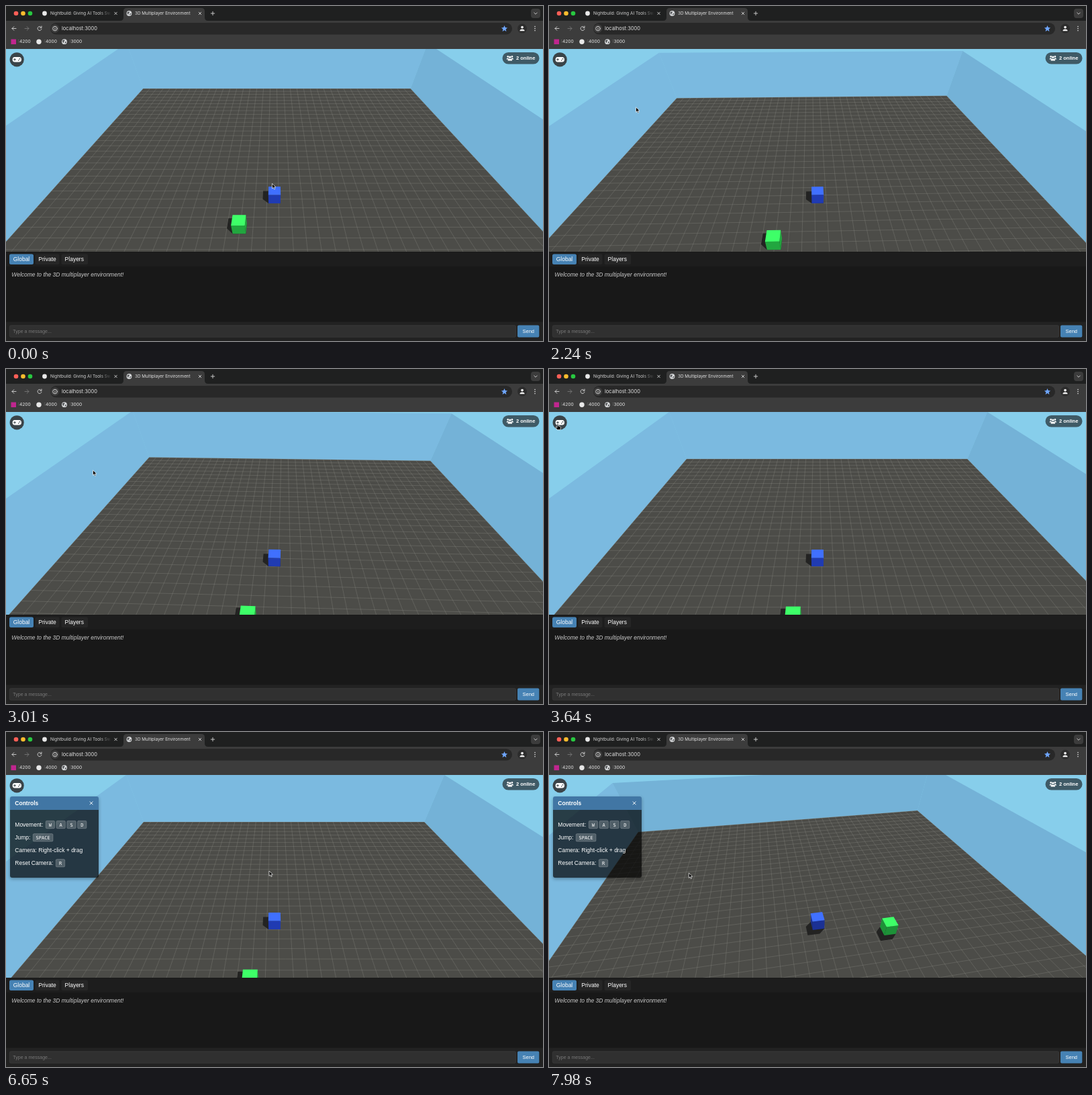
An HTML page with a canvas that plays this animation: 800x499 px, repeating every 8000 ms.

```html
<!DOCTYPE html>
<html lang="en">
<head>
<meta charset="utf-8">
<title>3D Multiplayer Environment</title>
<style>
html, body { margin: 0; width: 100%; height: 100%; overflow: hidden; background: #181818; }
canvas, svg, #shadow { position: absolute; left: 0; top: 0; }
canvas { top: 64px; }
#shadow { left: 6px; top: 96px; width: 132px; height: 121px; border-radius: 3px; box-shadow: 0 2px 5px rgba(0, 0, 0, .3); }
text { font-family: "Liberation Sans", Arial, sans-serif; font-size: 8.5px; fill: #fff; }
.ui { font-family: Inter, "Liberation Sans", sans-serif; font-size: 6.35px; fill: #e3e3e3; }
.key { font-family: "DejaVu Sans Mono", monospace; font-size: 7px; text-anchor: middle; }
.line { fill: none; stroke: #d5d5d5; stroke-width: .9; stroke-linecap: round; stroke-linejoin: round; }
</style>
</head>
<body>
<canvas id="scene" width="800" height="302"></canvas>
<div id="shadow"></div>
<svg id="ui" width="800" height="499" viewBox="0 0 800 499">
  <defs>
    <linearGradient id="fade" gradientUnits="userSpaceOnUse" x1="140" x2="157" y1="0" y2="0">
      <stop offset="0" stop-color="#d2d2d2"/><stop offset="1" stop-color="#d2d2d2" stop-opacity="0"/>
    </linearGradient>
    <g id="globe">
      <circle r="3.9" fill="#d4d6d8"/>
      <path d="M-3-1.6Q-1-3 .4-2.4Q.4-.6-1-.2Q-.6 1.6-2 1.8ZM1 .4Q3-.6 3 .6Q2 2.6 .8 2.8Z" fill="#4a4c4e"/>
    </g>
    <path id="cross" class="line" d="M-1.8-1.8L1.8 1.8M1.8-1.8L-1.8 1.8"/>
  </defs>

  <!-- browser window -->
  <rect width="800" height="22" fill="#1f2020"/>
  <rect y="22" width="800" height="42" fill="#3c3c3c"/>
  <path d="M170 22Q175 22 175 17V8Q175 3 180 3H291Q296 3 296 8V17Q296 22 301 22Z" fill="#3c3c3c"/>
  <circle cx="15" cy="11" r="3.3" fill="#ff5f57"/>
  <circle cx="25.5" cy="11" r="3.3" fill="#febc2e"/>
  <circle cx="36" cy="11" r="3.3" fill="#28c840"/>
  <circle cx="57.5" cy="11" r="3.4" fill="#e8e8e8"/>
  <text class="ui" x="66" y="13.2" style="fill:url(#fade)">Nightbuild: Giving AI Tools Sway</text>
  <use href="#cross" x="163.5" y="11"/>
  <use href="#globe" x="183.5" y="11"/>
  <text class="ui" x="192" y="13.2">3D Multiplayer Environment</text>
  <use href="#cross" x="289" y="11"/>
  <path class="line" d="M305.3 11H310.7M308 8.3V13.7"/>
  <rect x="782" y="4" width="14" height="14" rx="4" fill="#3c3c3c"/>
  <path class="line" d="M786.8 10L789 12.2L791.2 10"/>

  <rect x="66" y="25" width="688" height="17.5" rx="8.7" fill="#282828"/>
  <path class="line" d="M15 33.5H9M11.8 30.7L9 33.5L11.8 36.3"/>
  <path class="line" d="M28 33.5H34M31.2 30.7L34 33.5L31.2 36.3" style="stroke:#777"/>
  <path class="line" d="M52.4 31.6A3 3 0 1 0 53 34.2M53 30V32.4H50.6"/>
  <circle cx="73" cy="33.6" r="6.3" fill="#3c3c3c"/>
  <circle class="line" cx="73" cy="33.6" r="3.3"/>
  <path class="line" d="M73 33.4V35.2M73 31.9V32"/>
  <text class="ui" x="83" y="36.3" style="font-size:7.5px">localhost:3000</text>
  <path d="M742.5 29L743.8 32.1L747.1 32.4L744.6 34.6L745.4 37.9L742.5 36.1L739.6 37.9L740.4 34.6L737.9 32.4L741.2 32.1Z" fill="#6ea5fb"/>
  <circle cx="769" cy="33.6" r="7" fill="#2c2c2c"/>
  <circle cx="769" cy="31.6" r="1.9" fill="#eee"/>
  <path d="M765.4 37.2Q765.4 34.4 769 34.4Q772.6 34.4 772.6 37.2Z" fill="#eee"/>
  <g fill="#ddd"><circle cx="788" cy="30.6" r=".8"/><circle cx="788" cy="33.6" r=".8"/><circle cx="788" cy="36.6" r=".8"/></g>

  <rect x="7.5" y="49.5" width="7.5" height="7.5" fill="#c0268f"/>
  <text class="ui" x="18" y="55.4" style="font-size:6.7px">:4200</text>
  <circle cx="49" cy="53.2" r="3.7" fill="#e8e8e8"/>
  <text class="ui" x="57" y="55.4" style="font-size:6.7px">:4000</text>
  <use href="#globe" x="87" y="53.2"/>
  <text class="ui" x="94.5" y="55.4" style="font-size:6.7px">:3000</text>

  <!-- overlay buttons -->
  <circle cx="16.2" cy="79.8" r="10.6" fill="#3a4449"/>
  <path fill-rule="evenodd" fill="#fff" d="M13 76H19.4Q23 76 23 79.8Q23 83.6 19.4 83.6H13Q9.6 83.6 9.6 79.8Q9.6 76 13 76ZM12.5 78V79.3H11.2V80.3H12.5V81.6H13.5V80.3H14.8V79.3H13.5V78ZM18 80.2V81.6H19.4V80.2ZM19.8 78V79.4H21.2V78Z"/>
  <rect x="739.5" y="69" width="55" height="17.6" rx="8.8" fill="#3f5a66"/>
  <g fill="#fff">
    <circle cx="747.7" cy="75.3" r="1.3"/><circle cx="753.9" cy="75.3" r="1.3"/><circle cx="750.8" cy="76.2" r="1.6"/>
    <path d="M745.6 79.6Q745.6 77.2 748.6 77.2V79.6ZM756 79.6Q756 77.2 753 77.2V79.6ZM747.5 81.6Q747.5 78.4 750.8 78.4Q754.1 78.4 754.1 81.6Z"/>
  </g>
  <text x="760" y="80.4" style="font-size:7.5px;font-weight:700">2 online</text>

  <!-- controls panel -->
  <g id="panel">
    <path d="M6 116V99Q6 96 9 96H135Q138 96 138 99V116Z" fill="#3f74a3" fill-opacity=".97"/>
    <path d="M6 116H138V214Q138 217 135 217H9Q6 217 6 214Z" fill="#000" fill-opacity=".7"/>
    <text x="13.3" y="109" font-weight="700">Controls</text>
    <path class="line" d="M125 103.8L129.2 108M129.2 103.8L125 108" style="stroke:#fff"/>
    <text x="13.3" y="141">Movement:</text>
    <text x="13.3" y="160">Jump:</text>
    <text x="13.3" y="179.2">Camera: Right-click + drag</text>
    <text x="13.3" y="198.2">Reset Camera:</text>
    <g id="keys"></g>
  </g>

  <!-- chat -->
  <rect y="366.5" width="800" height="132.5" fill="#181818"/>
  <rect y="366.5" width="800" height="21.5" fill="#1d1d1d"/>
  <rect x="5" y="369.5" width="36" height="15.5" rx="2.5" fill="#4682b4"/>
  <rect x="43.5" y="369.5" width="36" height="15.5" rx="2.5" fill="#262626"/>
  <rect x="82.5" y="369.5" width="39.5" height="15.5" rx="2.5" fill="#262626"/>
  <text x="10.7" y="380.4">Global</text>
  <text x="48.3" y="380.4">Private</text>
  <text x="87.6" y="380.4">Players</text>
  <text x="8.3" y="403.3" style="font-style:italic;fill:#c8c8c8">Welcome to the 3D multiplayer environment!</text>
  <rect y="470.5" width="800" height="28.5" fill="#222"/>
  <rect x="5.3" y="475.8" width="754.4" height="17.4" rx="2" fill="#303030" stroke="#414141" stroke-width=".6"/>
  <text x="10.3" y="487" style="font-size:7.05px;fill:#777">Type a message...</text>
  <rect x="762" y="475.5" width="32.3" height="18" rx="2" fill="#4682b4"/>
  <text x="769.5" y="487.2" style="font-size:7.5px">Send</text>

  <g id="cursor">
    <path id="arrow" d="M0 0V7.4L1.8 5.8L3 8.6L4.3 8L3.1 5.4L5.4 5.2Z" fill="#000" stroke="#fff" stroke-width=".7"/>
    <path id="hand" d="M-.9.2Q0-.8.9.2V3L3.6 3.6Q4.6 4 4.5 5.2L3.8 8.6H-.6L-3.2 5.2Q-3.2 4-2 4.4L-.9 5.4Z" fill="#000" stroke="#fff" stroke-width=".7"/>
  </g>
</svg>
<script>
const LOOP = 8000, STEP = 70, FOCAL = 376.7, RISE = 15, HALF = 20, WALL = 6;
const PANEL_AT = 4200;

// time, x, z, yaw in degrees, camera distance along the ground
const PLAYER = [
  [2030, -.35, 3, 0, 15], [2240, .25, 1.5, -1.2, 15.6], [2380, .5, .6, -.8, 15.5], [2590, .11, .52, 2.58, 15.12],
  [2870, -1.35, .45, 3, 15], [3080, -1.35, .45, 1, 15], [3360, -1.35, .45, 0, 15], [6650, -1.35, .45, 0, 15],
  [6790, -1.35, .45, -16, 14.3], [6930, -1.35, .45, -55, 13.4], [7070, -1.35, .45, -86, 14.2],
  [7210, -1.35, .45, -97.4, 14.82], [7420, -1.35, .45, -99.7, 15], [7700, -1.35, .45, -100.4, 15]
];
// time, x, y
const POINTER = [
  [840, 396.5, 264.5], [1050, 310, 226], [1330, 134, 154], [1470, 134, 154], [1610, 129.5, 150.8],
  [3150, 129.5, 150.8], [3500, 13, 82], [6090, 13, 82], [6230, 210, 160], [6370, 392, 207],
  [6650, 392, 207], [6860, 300, 209], [7070, 208.3, 210]
];
const GREEN = [-3, 6.12];
const BLUE_SKIN = { top: "#4070ff", lit: "#203bb2", dim: "#1b3194" };
const GREEN_SKIN = { top: "#3eff68", lit: "#22a63f", dim: "#1d9138" };

const $ = id => document.getElementById(id);
const ctx = $("scene").getContext("2d");

function sample(track, t) {
  const i = track.findIndex(row => row[0] > t);
  if (i === 0) return track[0].slice(1);
  if (i < 0) return track[track.length - 1].slice(1);
  const a = track[i - 1], b = track[i], u = (t - a[0]) / (b[0] - a[0]);
  return a.slice(1).map((v, k) => v + (b[k + 1] - v) * u);
}

let px, pz, reach, sin, cos;

// camera space: right, up, depth; the camera looks at the player
function view([x, y, z]) {
  const dx = x - px, dz = z - pz, span = Math.hypot(reach, RISE);
  const ahead = reach - sin * dx - cos * dz, up = y - .5 - RISE;
  return [cos * dx - sin * dz, (up * reach + ahead * RISE) / span, (ahead * reach - up * RISE) / span];
}

function clip(points, near = .5) {
  const out = [];
  points.forEach((a, i) => {
    const b = points[(i + 1) % points.length];
    if (a[2] >= near) out.push(a);
    if ((a[2] < near) !== (b[2] < near)) {
      const u = (near - a[2]) / (b[2] - a[2]);
      out.push(a.map((v, k) => v + (b[k] - v) * u));
    }
  });
  return out;
}

function trace(points) {
  clip(points.map(view)).forEach(([x, y, d], i) =>
    ctx[i ? "lineTo" : "moveTo"](400 + FOCAL * x / d, 217.5 - FOCAL * y / d));
}

function fill(points, color) {
  ctx.beginPath();
  trace(points);
  ctx.closePath();
  ctx.fillStyle = color;
  ctx.fill();
}

function room() {
  ctx.fillStyle = "#87ceeb";
  ctx.fillRect(0, 0, 800, 302);
  const corners = [[-HALF, -HALF], [HALF, -HALF], [HALF, HALF], [-HALF, HALF]];
  corners.forEach(([x, z], i) => {
    const [u, w] = corners[(i + 1) % 4];
    const color = i === 0 || i === 3 ? "#7bbae0" : "#74b2d7";
    fill([[x, 0, z], [u, 0, w], [u, WALL, w], [x, WALL, z]], color);
  });
  fill(corners.map(([x, z]) => [x, 0, z]), "#4c4c48");
  ctx.beginPath();
  for (let i = -HALF; i <= HALF; i++) {
    trace([[i, 0, -HALF], [i, 0, HALF]]);
    trace([[-HALF, 0, i], [HALF, 0, i]]);
  }
  ctx.strokeStyle = "rgba(150,150,146,.42)";
  ctx.lineWidth = .65;
  ctx.stroke();
}

function cube(x, z, skin) {
  const h = .5;
  const shade = [[-1, -1], [0, -1], [h, -h], [h, h], [-h, h], [-1, 0]];
  fill(shade.map(([a, b]) => [x + a, 0, z + b]), "#232322");
  const eyeX = px + reach * sin, eyeZ = pz + reach * cos;
  [[1, 0], [0, 1], [-1, 0], [0, -1]].forEach(([nx, nz]) => {
    if ((eyeX - x) * nx + (eyeZ - z) * nz <= h) return;
    const cx = x + nx * h, cz = z + nz * h, ax = nz * h, az = nx * h;
    fill([[cx - ax, 0, cz - az], [cx + ax, 0, cz + az], [cx + ax, 1, cz + az], [cx - ax, 1, cz - az]],
      nx + nz > 0 ? skin.lit : skin.dim);
  });
  fill([[x - h, 1, z - h], [x + h, 1, z - h], [x + h, 1, z + h], [x - h, 1, z + h]], skin.top);
}

function keyCap(label, x, y, w) {
  return `<rect x="${x}" y="${y}" width="${w}" height="11.4" rx="1.6" fill="#fff" fill-opacity=".2"
    stroke="#fff" stroke-opacity=".32" stroke-width=".6"/>
    <text class="key" x="${x + w / 2}" y="${y + 8.2}">${label}</text>`;
}
$("keys").innerHTML = [..."WASD"].map((c, i) => keyCap(c, 59.2 + 15.8 * i, 132.3, 13.4)).join("")
  + keyCap("SPACE", 40.2, 151.6, 29.8) + keyCap("R", 74.3, 189.6, 13.4);

function show(id, on) {
  $(id).style.display = on ? "" : "none";
}

function draw(now) {
  const t = Math.floor(now % LOOP / STEP) * STEP;
  let yaw;
  [px, pz, yaw, reach] = sample(PLAYER, t);
  sin = Math.sin(yaw * Math.PI / 180);
  cos = Math.cos(yaw * Math.PI / 180);
  room();
  cube(px, pz, BLUE_SKIN);
  cube(...GREEN, GREEN_SKIN);

  const [mx, my] = sample(POINTER, t);
  const hover = Math.hypot(mx - 16.2, my - 79.8) < 10.6;
  $("cursor").setAttribute("transform", `translate(${mx} ${my})`);
  show("arrow", !hover);
  show("hand", hover);
  show("panel", t >= PANEL_AT);
  show("shadow", t >= PANEL_AT);
}

const start = performance.now();
function tick() {
  draw(performance.now() - start);
  requestAnimationFrame(tick);
}
tick();
</script>
</body>
</html>
```
